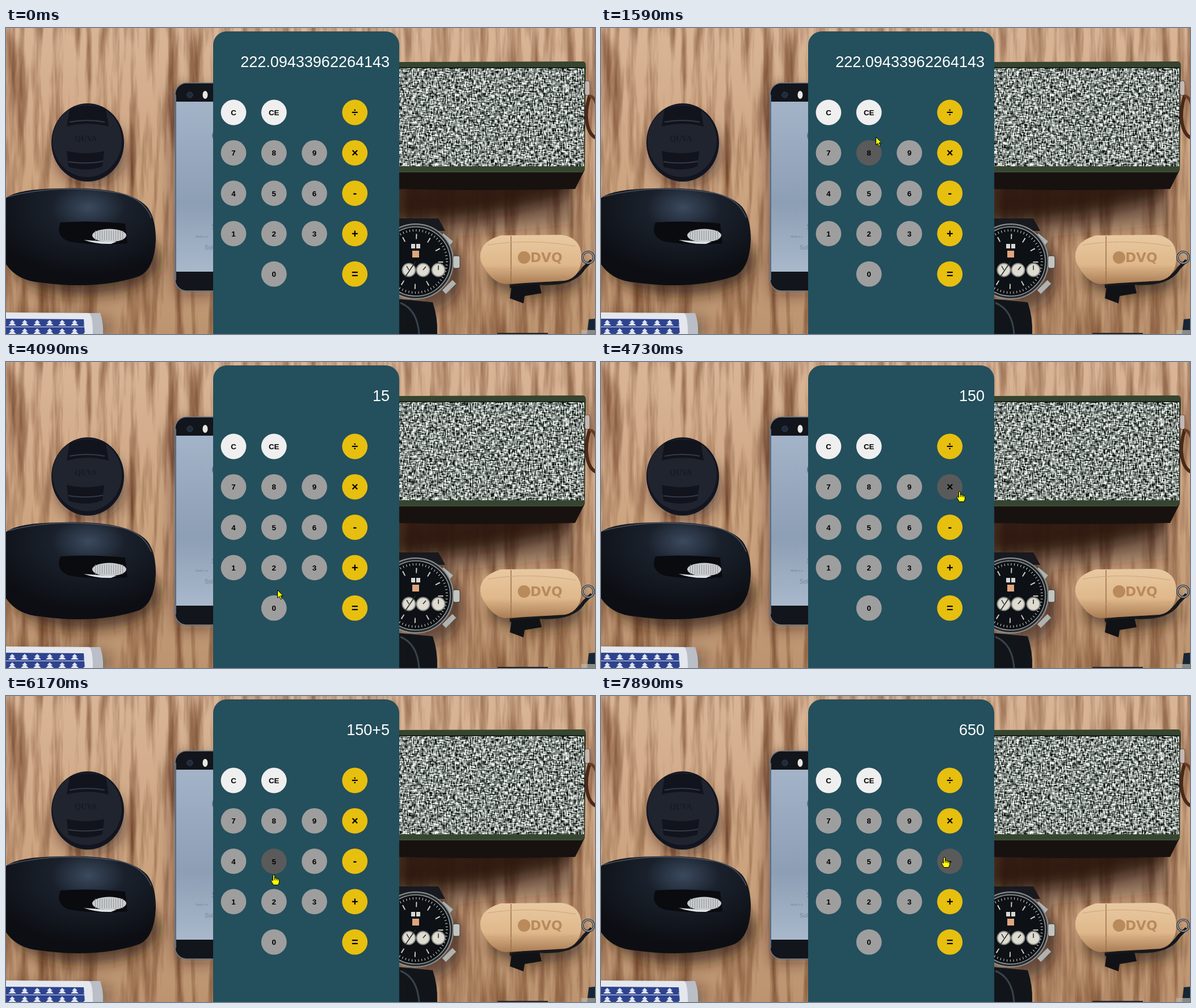
Animation, 1038 px wide and 540 px high, one loop 8000 ms. Source, as an HTML page:

```html
<!DOCTYPE html>
<html lang="en">
<head>
<meta charset="utf-8">
<title>Calculator</title>
<style>
html, body { margin: 0; width: 100%; height: 100%; overflow: hidden; background: #c79e7c; }
svg { position: absolute; left: 0; top: 0; }
#desk { will-change: transform; }
#app { font-family: "Liberation Sans", Arial, sans-serif; }
#keys text { font-weight: bold; text-anchor: middle; }
</style>
</head>
<body>
<svg id="desk" width="1038" height="540" viewBox="0 0 1038 540">
  <defs>
    <linearGradient id="wood" x2="0" y2="1">
      <stop stop-color="#d9b597"/><stop offset=".5" stop-color="#cda581"/><stop offset="1" stop-color="#bc9470"/>
    </linearGradient>
    <linearGradient id="screen" x2="0" y2="1">
      <stop stop-color="#a3b3c8"/><stop offset=".6" stop-color="#8d9fb5"/><stop offset="1" stop-color="#a9b8cb"/>
    </linearGradient>
    <radialGradient id="mouse" cx=".55" cy=".2" r=".7">
      <stop stop-color="#3b4a5f"/><stop offset=".35" stop-color="#1a212c"/><stop offset="1" stop-color="#0c0e13"/>
    </radialGradient>
    <linearGradient id="stick" x2="0" y2="1">
      <stop stop-color="#e9c9a2"/><stop offset=".6" stop-color="#dfb88b"/><stop offset="1" stop-color="#a97c54"/>
    </linearGradient>
    <filter id="blur" x="-40%" y="-40%" width="180%" height="180%"><feGaussianBlur stdDeviation="14"/></filter>
    <filter id="grain" x="0" y="0" width="100%" height="100%" color-interpolation-filters="sRGB">
      <feTurbulence type="fractalNoise" baseFrequency=".06 .005" numOctaves="4" seed="8"/>
      <feColorMatrix values="0 0 0 0 .45  0 0 0 0 .27  0 0 0 0 .16  1.9 0 0 0 -.78"/>
    </filter>
    <filter id="weave" x="0" y="0" width="100%" height="100%" color-interpolation-filters="sRGB">
      <feTurbulence type="fractalNoise" baseFrequency=".13 .45" numOctaves="2" seed="3" result="a"/>
      <feTurbulence type="fractalNoise" baseFrequency=".45 .13" numOctaves="2" seed="5"/>
      <feComposite in2="a" operator="arithmetic" k2=".5" k3=".5"/>
      <feColorMatrix values="3.2 0 0 0 -1.08  3.2 0 0 0 -1.05  3.2 0 0 0 -1.07  0 0 0 0 1"/>
    </filter>
    <pattern id="cards" width="22" height="15" y="514" patternUnits="userSpaceOnUse">
      <path fill="#dfe4f2" d="M11 1l5 5h-3l5 5h-14l5-5h-3zM0 13h22v1h-22z"/>
    </pattern>
  </defs>

  <rect width="1038" height="540" fill="url(#wood)"/>
  <rect width="1038" height="540" filter="url(#grain)"/>

  <g filter="url(#blur)" fill="#2b1a12">
    <path d="M680 240H1012L990 300Q850 340 680 345Z" opacity=".95"/>
    <path d="M680 300H1000V345L680 380Z" opacity=".4"/>
    <ellipse cx="150" cy="222" rx="62" ry="55" opacity=".6"/>
    <ellipse cx="140" cy="410" rx="132" ry="62" opacity=".75"/>
    <path d="M292 110H370V470H300Z" opacity=".5"/>
    <ellipse cx="935" cy="440" rx="85" ry="32" opacity=".65"/>
    <ellipse cx="745" cy="430" rx="60" ry="70" opacity=".6"/>
    <path d="M0 515H182V545H0Z" opacity=".5"/>
  </g>

  <!-- lens cap -->
  <ellipse cx="144" cy="202" rx="64" ry="69" fill="#121520"/>
  <ellipse cx="143" cy="199" rx="61" ry="64" fill="#20242f"/>
  <path d="M112 143Q143 130 176 143L181 174Q144 164 107 174Z" fill="#11141d"/>
  <path d="M107 217Q143 225 173 217L170 244Q143 255 110 245Z" fill="#11141d"/>
  <path d="M112 166Q143 160 174 166M110 236Q143 241 171 235" fill="none" stroke="#333946" stroke-width="2"/>
  <text x="141" y="200" fill="#171a23" font-size="14" text-anchor="middle" font-family="Liberation Serif, serif" font-weight="bold">QUVA</text>

  <!-- mouse -->
  <path d="M0 300Q20 284 95 283Q215 279 249 316Q264 335 264 374Q262 425 235 438Q160 463 60 449Q20 446 0 417Z" fill="url(#mouse)"/>
  <path d="M3 298Q90 275 190 290Q240 296 256 335" fill="none" stroke="#4a525e" stroke-width="1.5"/>
  <path d="M96 343Q150 339 210 345L214 380Q160 385 112 377Q86 368 96 343Z" fill="#090b0f"/>
  <path d="M137 374Q170 377 195 377L185 381Q160 382 137 374Z" fill="#dce2e6"/>
  <ellipse cx="182" cy="366" rx="30" ry="11.5" fill="#c9ccce"/>
  <path d="M157 366h50" stroke="#909698" stroke-width="17" stroke-dasharray="1 3"/>

  <!-- cards -->
  <path d="M0 504L166 503Q172 520 171 540H0Z" fill="#b9bec7"/>
  <path d="M0 502L146 503Q153 505 153 540H0Z" fill="#e4e7ed"/>
  <path d="M0 513L137 514L139 540H0Z" fill="#2e438e"/>
  <path d="M0 513L137 514L139 540H0Z" fill="url(#cards)"/>

  <!-- phone -->
  <rect x="298" y="97" width="110" height="367" rx="20" fill="#12151b" stroke="#717b85" stroke-width="1.5"/>
  <path d="M299 130H380V430H299Z" fill="url(#screen)"/>
  <path d="M299 118V445" stroke="#5c6c82" stroke-width="2"/>
  <circle cx="324" cy="118" r="5" fill="#202b3a" stroke="#34445a"/>
  <ellipse cx="351" cy="118" rx="4.5" ry="7" fill="#e7e7df"/>
  <circle cx="374" cy="190" r="11" fill="#65768c"/>
  <g fill="#748499" font-family="Liberation Sans, sans-serif">
    <text x="362" y="356" font-size="15">S</text>
    <text x="334" y="370" font-size="5">Made in a</text>
    <text x="350" y="391" font-size="10">Sol</text>
  </g>

  <!-- speaker -->
  <path d="M690 250H1020L1003 284Q850 288 690 284Z" fill="#171210"/>
  <path d="M690 60L1018 59Q1022 60 1022 68L1020 250Q1019 254 1012 254H690Z" fill="#36452f"/>
  <path d="M690 69H1020V244H690Z" fill="#18211a"/>
  <path d="M690 71H1019V244H690Z" filter="url(#weave)"/>
  <path d="M690 254H1016" stroke="#52604b"/>
  <path d="M1029 118Q1020 146 1024 168Q1028 190 1042 195" fill="none" stroke="#49281a" stroke-width="6"/>
  <path d="M1028 120Q1036 120 1040 133" fill="none" stroke="#673b25" stroke-width="5"/>
  <rect x="1020" y="93" width="9" height="26" rx="4" fill="#c4b8b3" stroke="#5b4a43"/>

  <!-- watch -->
  <path d="M690 478L752 484Q761 510 760 540H690Z" fill="#11151a"/>
  <path d="M695 485Q725 497 728 540" fill="none" stroke="#38434c" stroke-width="3"/>
  <path d="M690 336H762L774 358H690Z" fill="#181a1f"/>
  <path d="M768 366l17 14M772 466l18-18M782 413h15" stroke="#aeb2b1" stroke-width="9"/>
  <rect x="788" y="402" width="12" height="22" rx="3" fill="#c3c4bf" stroke="#343434"/>
  <circle cx="722" cy="412" r="66" fill="#272b2f" stroke="#8d9394" stroke-width="2"/>
  <circle cx="722" cy="412" r="61" fill="#0d1014" stroke="#969c9c" stroke-width="1.5"/>
  <circle cx="722" cy="412" r="55" fill="none" stroke="#d7d7d2" stroke-width="4" stroke-dasharray="1 4.76"/>
  <circle cx="722" cy="412" r="44" fill="none" stroke="#c9cac6" stroke-width="9" stroke-dasharray="2 21.04"/>
  <path d="M714 381h16v8h-16z" fill="#d8d8d4"/><path d="M722 380v10" stroke="#111" stroke-width="2"/>
  <rect x="716" y="393" width="12" height="12" fill="#e0a67e"/>
  <g fill="#dedbd0" stroke="#8b8d89" stroke-width="2">
    <circle cx="710" cy="427" r="11.5"/><circle cx="735" cy="427" r="11.5"/><circle cx="762" cy="427" r="11.5"/>
  </g>
  <path d="M710 427l-4-7M735 427l5-6M762 427v-8M722 412L703 440" stroke="#24282b" stroke-width="1.5"/>

  <!-- flash drive -->
  <path d="M888 456L935 450Q1000 455 1018 424L1032 410" fill="none" stroke="#17181d" stroke-width="6"/>
  <path d="M891 456L940 452L944 468L914 473L912 486L888 477Z" fill="#111216"/>
  <path d="M872 366L978 365Q1013 369 1014 403Q1014 440 985 446L880 452Q855 450 837 412Q829 379 872 366Z" fill="url(#stick)"/>
  <path d="M890 367V451" stroke="#9c7148" stroke-width="1.5"/>
  <path d="M849 383Q920 371 1004 385M846 424Q930 433 1004 423" fill="none" stroke="#cda577"/>
  <circle cx="913" cy="405" r="11" fill="#b98a5b"/>
  <text x="924" y="413" fill="#b98a5b" font-size="23" font-weight="bold" font-family="DejaVu Sans, sans-serif">DVQ</text>
  <circle cx="1026" cy="405" r="10" fill="none" stroke="#30343a" stroke-width="4"/>
  <circle cx="1026" cy="405" r="10" fill="none" stroke="#a5a9aa" stroke-width="1.5"/>
  <path d="M866 538h89v2h-89z" fill="#262321"/>
  <path d="M1027 514L1038 513V540H1024Z" fill="#172634"/>
  <path d="M1014 533h24v7h-24z" fill="#bbb7ac" opacity=".7"/>
</svg>

<svg id="app" width="1038" height="540" viewBox="0 0 1038 540">
  <path d="M365 540V30A24 24 0 0 1 389 6H669A24 24 0 0 1 693 30V540Z" fill="#244f5c"/>
  <text id="display" x="676" y="69" font-size="27" fill="#fff" text-anchor="end"></text>
  <g id="keys"></g>
  <g id="cursor" fill="#ff0" stroke="#000" stroke-linejoin="round">
    <path id="arrow" d="M.5 .5V14.5L3.7 11.5L6 16.7L8.3 15.7L6 10.6H10.5Z"/>
    <path id="hand" d="M-1.5 11V2Q-1.5 .5 0 .5T1.5 2V6.5Q3.5 5.4 4.3 7Q6.3 6.2 7 7.8Q9.5 7.3 9.5 9.5V13.5L7.8 18.5H-.5L-4.5 12Q-5.3 10.2-4 9.8Q-2.8 9.5-1.5 11ZM1.5 6.5V10M4.3 7.2V10.3M7 8V10.8"/>
  </g>
</svg>

<script>
const LOOP = 8000, R = 22.4, HOVER_LAG = 40;
const $ = id => document.getElementById(id);

// Pointer positions: time, x, y
const path = [
  [20, 1034, 538], [450, 690, 340], [710, 584, 245], [800, 602, 218],
  [950, 560, 275], [1210, 404, 364], [1340, 412, 296],
  [1540, 481, 207], [1590, 484, 192], [1620, 484, 185], [1800, 452, 150],
  [1940, 452, 150], [2600, 416, 350], [2840, 410, 378],
  [3260, 410, 378], [3640, 471, 298], [3850, 474, 297],
  [4050, 477, 388], [4090, 478, 402], [4210, 474, 430], [4430, 475, 431],
  [4730, 632, 228], [4870, 634, 263], [5100, 620, 365],
  [5310, 620, 365], [5720, 474, 293], [6080, 471, 293],
  [6170, 472, 315], [6400, 473, 431], [6760, 474, 433],
  [7080, 605, 433], [7380, 608, 432], [7740, 597, 301], [7890, 605, 284], [8000, 605, 284]
];

const readout = [
  [0, '222.09433962264143'], [1940, ''], [3260, '1'], [3740, '15'], [4330, '150'], [5310, '150+'],
  [5850, '150+5'], [6560, '150+50'], [6750, '150+500'], [7350, '650']
];

const rows = [['C', 'CE', '', '÷'], ['7', '8', '9', '×'], ['4', '5', '6', '-'], ['1', '2', '3', '+'], ['', '0', '', '=']];

function add(tag, attrs, text = '') {
  const el = document.createElementNS('http://www.w3.org/2000/svg', tag);
  for (const k in attrs) el.setAttribute(k, attrs[k]);
  el.textContent = text;
  return $('keys').appendChild(el);
}

const keys = [];
rows.forEach((row, r) => row.forEach((label, c) => {
  if (!label) return;
  const x = 401 + c * 71.25, y = 149 + r * 71.3, op = c === 3;
  const fill = op ? '#e7bf0f' : r ? '#9e9e9e' : '#efefef';
  const disc = add('circle', { cx: x, cy: y, r: R });
  add('text', { x, y: y + (op ? 6.6 : 5), 'font-size': op ? 20 : 13.33 }, label);
  keys.push({ x, y, fill, disc });
}));

// Monotone cubic interpolation: smooth, without overshoot at rests
function slope(i, d) {
  const a = path[i - 1], b = path[i], c = path[i + 1];
  if (!a || !c) return 0;
  const u = (b[d] - a[d]) / (b[0] - a[0]), v = (c[d] - b[d]) / (c[0] - b[0]);
  return u * v > 0 ? 2 * u * v / (u + v) : 0;
}

function pointer(t) {
  t = Math.max(t, path[0][0]);
  const i = path.findIndex(p => p[0] > t) - 1;
  const a = path[i], b = path[i + 1], h = b[0] - a[0], s = (t - a[0]) / h;
  return [1, 2].map(d =>
    a[d] + (b[d] - a[d]) * s * s * (3 - 2 * s) +
    h * s * (1 - s) * (slope(i, d) * (1 - s) - slope(i + 1, d) * s));
}

const over = (key, [x, y], slop = 0) => Math.hypot(x - key.x, y - key.y) < R + slop;

function draw(now) {
  const t = now % LOOP, at = pointer(t), felt = pointer(t - HOVER_LAG);
  $('display').textContent = readout.filter(s => s[0] <= t).pop()[1];
  for (const k of keys) k.disc.setAttribute('fill', over(k, felt) ? '#5a5a5a' : k.fill);
  const onKey = keys.some(k => over(k, at, 1.5));
  $('hand').style.display = onKey ? '' : 'none';
  $('arrow').style.display = onKey ? 'none' : '';
  $('cursor').style.display = t < path[0][0] ? 'none' : '';
  $('cursor').setAttribute('transform', `translate(${at.map(Math.round)})`);
}

const start = performance.now();
function tick() {
  draw(performance.now() - start);
  requestAnimationFrame(tick);
}
tick();
</script>
</body>
</html>
```
